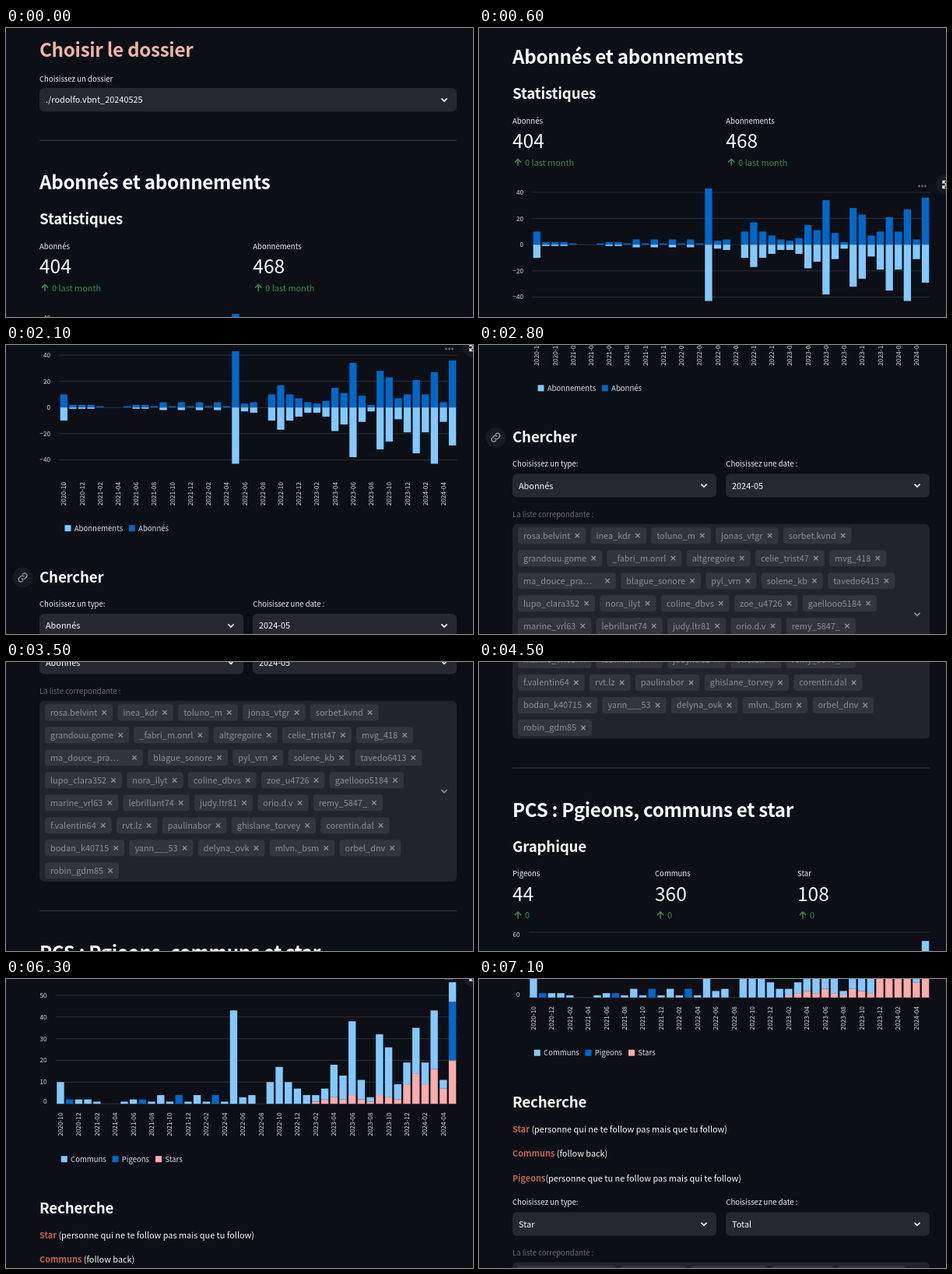
Animation, 600 px wide and 371 px high, one loop 7200 ms. Source, as an HTML page:

```html
<!DOCTYPE html>
<html lang="fr">
<head>
<meta charset="utf-8">
<style>
html, body { margin: 0; width: 100%; height: 100%; overflow: hidden; background: #0c0f16; }
svg { display: block; width: 600px; height: 371px; }
text { font-family: "Noto Sans CJK SC", "Noto Sans CJK JP", "Noto Sans CJK KR", "Noto Sans", sans-serif; fill: #fafafa; white-space: pre; }
.title { font-size: 24.2px; font-weight: 700; letter-spacing: -.0125em; }
.subtitle { font-size: 18.7px; font-weight: 700; letter-spacing: -.009em; }
</style>
</head>
<body>
<svg viewBox="0 0 600 371"><g id="page"></g></svg>
<script>
const page = document.getElementById('page');
const LOOP = 7200, STEP = 100;
const BLUE = '#0068c9', SKY = '#83c9ff', PINK = '#ffabab', GREEN = '#3c8a4e';
const BOX = '#262830', DIM_BOX = '#22242c', CHIP = '#33353d', DIM = '#696b72';

function add(tag, attrs, parent = page) {
  const el = document.createElementNS('http://www.w3.org/2000/svg', tag);
  for (const k in attrs) el.setAttribute(k, attrs[k]);
  parent.appendChild(el);
  return el;
}
function text(x, y, str, size, attrs = {}) {
  const el = add('text', { x, y, 'font-size': size, ...attrs });
  el.textContent = str;
  return el;
}
const rect = (x, y, width, height, fill, rx = 0) => add('rect', { x, y, width, height, fill, rx });
const stroke = (d, color, width = 1, parent = page) =>
  add('path', { d, stroke: color, 'stroke-width': width, fill: 'none' }, parent);

const title = (y, str, fill = '#fafafa') => text(43, y, str, 24, { class: 'title', style: `fill:${fill}` });
const subtitle = (y, str) => text(43, y, str, 18, { class: 'subtitle' });
const label = (x, y, str, fill = '#eeeef0') => text(x, y, str, 9.55, { style: `fill:${fill}` });
const body = (x, y, str, fill = '#fafafa') => text(x, y, str, 10.9, { style: `fill:${fill}` });
const rule = y => stroke(`M43 ${y}H579`, '#3a3d44');
const chevron = (x, y, color = '#fafafa') =>
  stroke(`M${x - 3.6} ${y - 1.8}l3.6 3.6l3.6 -3.6`, color, 1.7);

function select(x, y, w, str) {
  rect(x, y, w, 30.3, BOX, 6);
  body(x + 8, y + 19.4, str);
  chevron(x + w - 16, y + 15.2);
}
function filters(y, type, date) {
  label(43, y, 'Choisissez un type:');
  label(317.3, y, 'Choisissez une date :');
  select(43, y + 9, 262, type);
  select(317, y + 9, 262, date);
  label(43, y + 64.7, 'La liste correpondante :', DIM);
}
function metric(x, y, name, value, delta) {
  label(x, y, name);
  text(x, y + 31.5, value, 24.5);
  stroke(`M${x + 7} ${y + 54.5}v-8.6m-4.1 4.2l4.1 -4.2l4.1 4.2`, GREEN, 1.5);
  body(x + 16, y + 54.4, delta, GREEN);
}
function legend(y, items) {
  for (const [x, name, color] of items) {
    rect(x, y, 8, 8, color);
    label(x + 12.3, y + 7.6, name, '#dcdde1');
  }
}

// Monthly data, 2020-10 to 2024-05: marked months, gentle waves between them.
const MONTHS = 44, LAST = MONTHS - 1, SURGE = 19;
const marks = { 0: 10, 19: 43, 22: 0, 24: 17, 30: 15, 32: 34, 34: 2, 35: 28, 36: 23, 39: 21, 41: 27, 43: 36 };
const wave = (i, mean, swing, crest, period) =>
  Math.round(mean + swing * Math.cos(2 * Math.PI * (i - crest) / period));
function gainedIn(i) {
  if (i in marks) return marks[i];
  if (i < 11) return wave(i, 1.2, 1.2, 2, 6.5);
  if (i < SURGE) return i % 2 ? 4 : 1;
  return wave(i, 7.3, 4.3, 24, 7.5);
}
function starsIn(i, gained) {
  if (i < 28) return 0;
  return Math.round(i < 38 ? 1 + .1 * gained : 5 + .42 * gained);
}
function monthData(i) {
  const gained = gainedIn(i), stars = starsIn(i, gained), total = gained + stars;
  const quiet = i > 0 && i < SURGE;
  const pigeons = i === LAST ? 27 : quiet && i % 4 === 1 ? gained : 0;
  const followed = quiet ? Math.round(.45 * gained) : total - pigeons;
  return { gained, followed, stars, pigeons, total };
}
const months = Array.from({ length: MONTHS }, (_, i) => monthData(i));

// Draws grid and labels, returns a bar drawer.
function axis(left, zero, unit, ticks, labelY) {
  const step = (579.4 - left) / MONTHS;
  const small = { style: 'fill:#dcdde1', 'text-anchor': 'end' };
  for (const [v, dy = 3] of ticks) {
    const y = zero - v * unit;
    stroke(`M${left} ${y}H579.4`, '#2d3036');
    text(left - 11.5, y + dy, String(v).replace('-', '−'), 8.2, small);
  }
  for (let i = 0; i < MONTHS; i += 2) {
    const m = i + 9, x = left + (i + .5) * step + 3;
    const name = `${2020 + Math.floor(m / 12)}-${String(m % 12 + 1).padStart(2, '0')}`;
    text(x, labelY, name, 8.25, { ...small, transform: `rotate(-90 ${x} ${labelY})` });
  }
  return (i, from, to, color) => {
    if (from !== to) rect(left + (i + .1) * step, zero - Math.max(from, to) * unit,
      step * .8, Math.abs(to - from) * unit, color);
  };
}
function toolbar(y) {
  const g = add('g', {});
  for (const x of [565.5, 569.5, 573.5]) add('circle', { cx: x, cy: y, r: 1.4, fill: '#6b6d73' }, g);
  add('circle', { cx: 600, cy: y - 2, r: 13, fill: '#171a20' }, g);
  stroke(`M596 ${y - 3}v-3.5h3.5M596 ${y - 1}v3.5h3.5M596.3 ${y - 6}l4 4l-4 4`, '#e6e6e8', 1.5, g);
  return g;
}

// Folder choice
title(36.5, 'Choisir le dossier', '#f0b3aa');
label(43, 68.5, 'Choisissez un dossier');
select(43, 77, 536, './rodolfo.vbnt_20240525');
rule(144.3);

// Followers
title(206.8, 'Abonnés et abonnements');
subtitle(252.3, 'Statistiques');
metric(43, 283.5, 'Abonnés', '404', '0 last month');
metric(317.3, 283.5, 'Abonnements', '468', '0 last month');
const bar1 = axis(68.5, 439.2, 1.68, [[40], [20], [0], [-20], [-40]], 535);
months.forEach((m, i) => {
  bar1(i, 0, m.gained, BLUE);
  bar1(i, 0, -m.followed, SKY);
});
const tools1 = toolbar(364);
legend(590.2, [[75.5, 'Abonnements', SKY], [157.8, 'Abonnés', BLUE]]);

// Search by date
const link = add('g', { transform: 'translate(21.5 657.5)' });
add('circle', { r: 13, fill: '#171a20' }, link);
for (const turn of [0, 180])
  stroke('M-1.6 1.2a2.9 2.9 0 0 0 4.3 .2l1.9 -1.9a2.9 2.9 0 0 0 -4.1 -4.1l-1.1 1.1', '#a3a4a9', 1.2, link)
    .setAttribute('transform', `rotate(${turn})`);
subtitle(664.3, 'Chercher');
filters(695, 'Abonnés', '2024-05');
rect(43, 768.5, 536, 232, DIM_BOX, 6);
const rows = [
  'rosa.belvint inea_kdr toluno_m jonas_vtgr sorbet.kvnd',
  'grandouu.gome _fabri_m.onrl altgregoire celie_trist47 mvg_418',
  'ma_douce_pra… blague_sonore pyl_vrn solene_kb tavedo6413',
  'lupo_clara352 nora_ilyt coline_dbvs zoe_u4726 gaellooo5184',
  'marine_vrl63 lebrillant74 judy.ltr81 orio.d.v remy_5847_',
  'f.valentin64 rvt.lz paulinabor ghislane_torvey corentin.dal',
  'bodan_k40715 yann___53 delyna_ovk mlvn._bsm orbel_dnv',
  'robin_gdm85'
];
rows.forEach((row, r) => {
  let x = 50;
  const y = 783.5 + 29 * r;
  for (const name of row.split(' ')) {
    const chip = rect(x, y - 10.5, 10, 21, CHIP, 4);
    const len = body(x + 7, y + 3.9, name, '#8d8e94').getComputedTextLength();
    const w = name.endsWith('…') ? 126 : len + 27;
    chip.setAttribute('width', w);
    stroke(`M${x + w - 13.7} ${y - 2.7}l5.4 5.4m0 -5.4l-5.4 5.4`, '#94959a', 1.3);
    x += w + 6.2;
  }
});
chevron(563, 884.5, '#8d8e94');
rule(1038);

// Groups
title(1100.7, 'PCS : Pgieons, communs et star');
subtitle(1145.5, 'Graphique');
metric(43, 1177, 'Pigeons', '44', '0');
metric(226, 1177, 'Communs', '360', '0');
metric(409, 1177, 'Star', '108', '0');
const bar2 = axis(64.1, 1416.2, 2.787, [[60, 6], [50], [40], [30], [20], [10], [0, -.7]], 1427.5);
months.forEach(({ stars, pigeons, total }, i) => {
  bar2(i, 0, stars, PINK);
  bar2(i, stars, stars + pigeons, BLUE);
  bar2(i, stars + pigeons, total, SKY);
});
const tools2 = toolbar(1255.5);
legend(1483.2, [[70.8, 'Communs', SKY], [136.5, 'Pigeons', BLUE], [192, 'Stars', PINK]]);

// Search by group
subtitle(1557, 'Recherche');
function definition(y, term, rest) {
  const el = body(43, y, '');
  add('tspan', { 'font-weight': 700, style: 'fill:#c4625b' }, el).textContent = term;
  el.append(rest);
}
definition(1589, 'Star', ' (personne qui ne te follow pas mais que tu follow)');
definition(1620.4, 'Communs', ' (follow back)');
definition(1652.4, 'Pigeons', '(personne que tu ne follow pas mais qui te follow)');
filters(1682.8, 'Star', 'Total');
rect(43, 1756, 536, 60, DIM_BOX, 6);
for (const [x, w] of [[49, 127], [182, 84], [272, 98], [376, 79], [461, 87]])
  rect(x, 1760.5, w, 21, CHIP, 4);

// Scroll position over time: [ms, px]
const path = [[0, 0], [600, 161], [2100, 359], [3500, 718.7], [4500, 902], [6300, 1256], [7200, 1409.5]];
function scrollAt(t) {
  const i = path.findIndex(p => p[0] > t);
  const [t0, y0] = path[i - 1], [t1, y1] = path[i];
  return y0 + (y1 - y0) * (t - t0) / (t1 - t0);
}
const show = (el, on) => el.setAttribute('visibility', on ? 'visible' : 'hidden');

function draw(ms) {
  const t = Math.floor(ms % LOOP / STEP) * STEP;
  page.setAttribute('transform', `translate(0 ${-scrollAt(t)})`);
  show(tools1, t >= 300);
  show(link, t >= 1700 && t < 3300);
  show(tools2, t >= 5700);
}

const start = performance.now();
function tick() {
  draw(performance.now() - start);
  requestAnimationFrame(tick);
}
tick();
</script>
</body>
</html>
```
